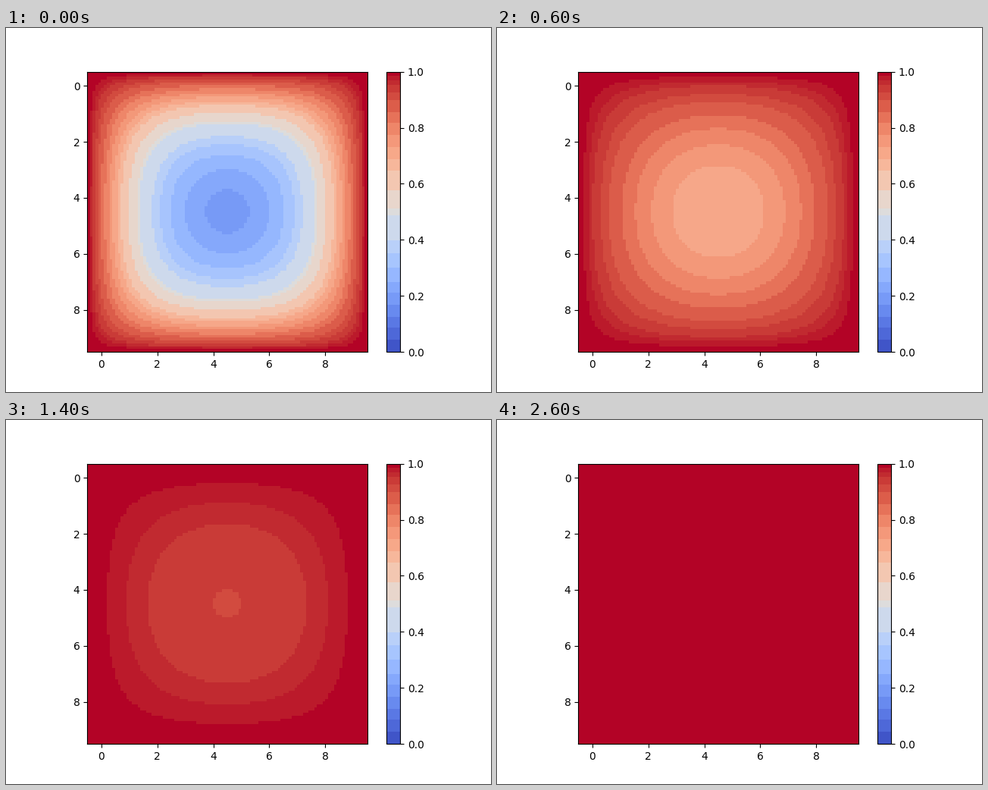
A matplotlib script that plays this animation: 640 px wide and 480 px high, repeating every 9 s.

```python
import matplotlib.pyplot as plt
import numpy as np
from matplotlib.animation import FuncAnimation
from matplotlib.colors import ListedColormap

FRAMES, INTERVAL = 90, 100
NODES = 100
COLD = 0.86                  # how far the plate starts below its edges
START, RATE = 0.217, 0.0888  # diffusion time of the first step, and per step
PAUSE, END = 20, 26          # the plate holds still from PAUSE until END


def banded_map(bands=24):
    """Coolwarm in flat bands, evenly spaced between a few key limits."""
    keys = [0, 6, 9, 10, 11, 13, 19, 21, 23, 24]
    values = [0, 0.25, 0.4, 0.49, 0.51, 0.648, 0.9, 0.9545, 0.986, 1]
    limits = np.interp(np.arange(bands + 1), keys, values)
    middles = (limits[:-1] + limits[1:]) / 2
    middles[-1] = 1
    index = np.digitize(np.linspace(0, 1, 256), limits[1:-1])
    return ListedColormap(plt.get_cmap("coolwarm")(middles[index]))


def plate(step):
    """Heat in an evenly cool square whose edges are kept at 1."""
    time = START + RATE * step
    angle = np.pi * np.arange(NODES) / (NODES - 1)
    profile = sum(4 / (np.pi * k) * np.exp(-k * k * time) * np.sin(k * angle)
                  for k in range(1, 20, 2))
    return 1 - COLD * np.outer(profile, profile)


fig, ax = plt.subplots(figsize=(6.4, 4.8), dpi=100)
image = ax.imshow(plate(0), cmap=banded_map(), vmin=0, vmax=1,
                  extent=(-0.5, 9.5, 9.5, -0.5), interpolation="nearest")
ax.set_xticks(range(0, 10, 2))
ax.set_yticks(range(0, 10, 2))
fig.colorbar(image)


def update(frame):
    step = min(frame, PAUSE) if frame < END else END
    image.set_data(plate(step))
    return [image]


anim = FuncAnimation(fig, update, frames=FRAMES, interval=INTERVAL,
                     repeat=True, repeat_delay=0)
plt.show()
```
